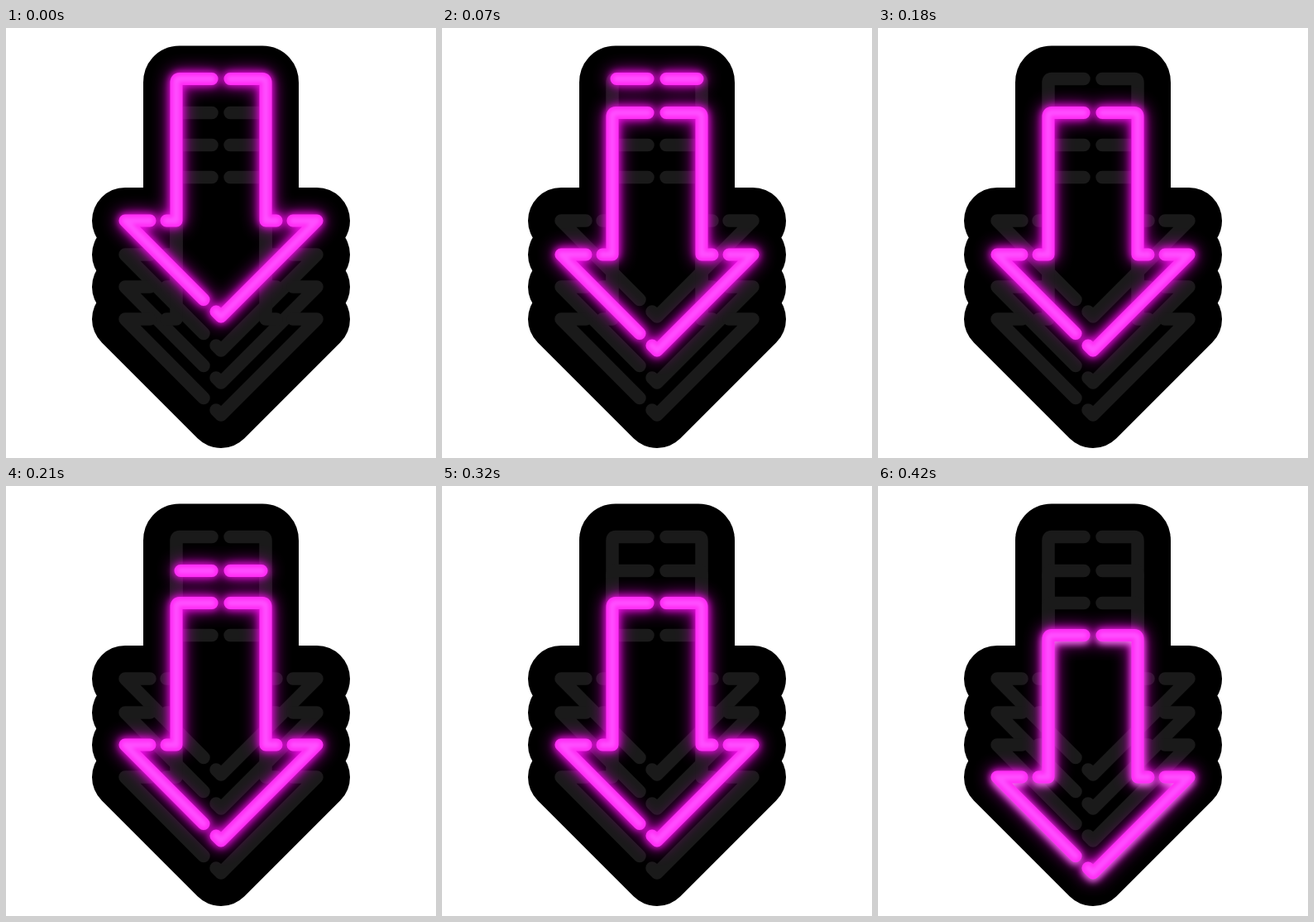
An HTML page that plays this animation: 520 by 520 pixels, repeating every 490 ms.

```html
<!DOCTYPE html>
<html lang="en">
<head>
<meta charset="utf-8">
<title>Neon arrow</title>
<style>
  html, body { margin: 0; width: 100%; height: 100%; overflow: hidden; background: #fff; }
  svg { display: block; width: 100vw; height: 100vh; }
  path, use { stroke-linecap: round; stroke-linejoin: round; }
  .tube { fill: none; }
  .halo { stroke: #d800d0; stroke-width: 20; filter: blur(10px); opacity: .8; }
  .glow { stroke: #ff10f5; stroke-width: 17; filter: blur(4px); opacity: .85; }
  .sheen { stroke: #ffc8ff; stroke-width: 13; filter: blur(4px); opacity: 0; }
  .low .sheen { opacity: .55; }
  .core { stroke: #ff2df5; stroke-width: 15; }
  .heart { stroke: #ff50ff; stroke-width: 7; filter: blur(2px); }
</style>
</head>
<body>
<svg viewBox="0 0 520 520">
  <defs>
    <path id="body" d="M206 233V66Q206 61.5 210 61.5H310Q314 61.5 314 66V233H376L260 349L144 233Z"/>
    <path id="arrow" d="M249 61.5H210Q206 61.5 206 66V233H194
      M271 61.5H310Q314 61.5 314 66V233H327
      M174 233H144L239 328.5 M347 233H376L260 349L254 343"/>
    <path id="bar" d="M211 61.5H249M271 61.5H309"/>
  </defs>
  <g id="board" fill="#000" stroke="#000" stroke-width="80"></g>
  <g id="off" class="tube" stroke="#1a1a1a" stroke-width="15.5"></g>
  <g id="lit"></g>
</svg>
<script>
  const NS = "http://www.w3.org/2000/svg";
  const STEP = 70, STEPS = 7;
  const drops = [0, 41, 80, 119];
  const layers = ["halo", "glow", "sheen", "core", "heart"];
  const byId = id => document.getElementById(id);

  function add(parent, tag, attrs) {
    const el = document.createElementNS(NS, tag);
    for (const key in attrs) el.setAttribute(key, attrs[key]);
    return parent.appendChild(el);
  }

  function neon(shape, y, low) {
    const g = add(byId("lit"), "g", { transform: `translate(0 ${y})`, class: low ? "low" : "" });
    for (const name of layers) {
      const attrs = { href: "#" + shape, class: "tube " + name };
      if (name === "sheen") attrs.y = 4;
      add(g, "use", attrs);
    }
    return g;
  }

  for (const y of drops) {
    add(byId("board"), "use", { href: "#body", y });
    add(byId("off"), "use", { href: "#arrow", y });
  }
  const bars = drops.slice(0, 3).map(y => neon("bar", y, false));
  const arrows = drops.map((y, i) => neon("arrow", y, i === 3));

  // On odd steps the top bar of the previous arrow lingers.
  function draw(step) {
    const current = Math.ceil(step / 2);
    arrows.forEach((g, i) => g.style.display = i === current ? "" : "none");
    bars.forEach((g, i) => g.style.display = step % 2 && i === current - 1 ? "" : "none");
  }

  const start = performance.now();
  function tick() {
    const t = Math.max(0, performance.now() - start);
    draw(Math.floor(t / STEP) % STEPS);
    requestAnimationFrame(tick);
  }
  tick();
</script>
</body>
</html>
```
